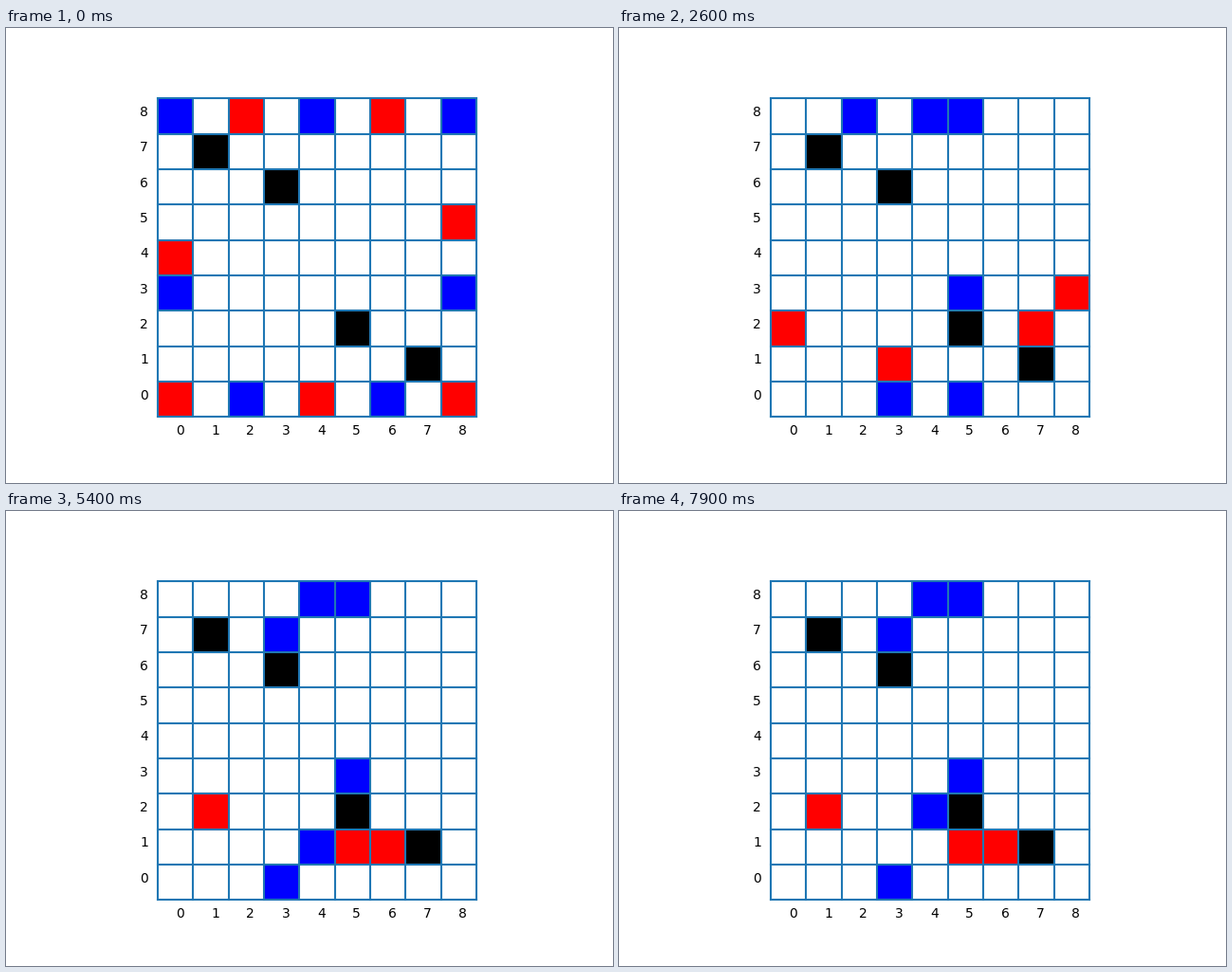
Recreate the animation shown at these times as a matplotlib script. Size 640x480 px, loop 8000 ms.

```python
import matplotlib.pyplot as plt
from matplotlib.animation import FuncAnimation
from matplotlib.patches import Rectangle

SIZE = 9
FRAMES = 80
INTERVAL = 100

STEP = {"N": (0, 1), "S": (0, -1), "E": (1, 0), "W": (-1, 0)}
WALLS = [(1, 7), (3, 6), (5, 2), (7, 1)]
BLUE = [(0, 8), (4, 8), (8, 8), (0, 3), (8, 3), (2, 0), (6, 0)]
RED = [(2, 8), (6, 8), (8, 5), (0, 4), (0, 0), (4, 0), (8, 0)]

# Column, row and direction of each turn; blue and red alternate.
OPENING = """
20E 85S 60W 80N 83W 81N 73W 84S 63W 68W 08E 00N 03S 04S 48W
03S 88W 01E 78W 58W 68W 11E 38E 21E 18E 82W 28E 72W 38S 62S
50W 61W 40N 83W 41N 73W 42S 63S 41N 62S 42S 02E 41N 12E 42S
""".split()
SHUFFLE = "22W 41N 12E 42S".split()


def neighbours(cell):
    x, y = cell
    return [(x + dx, y + dy) for dx, dy in STEP.values()]


def play(board, move):
    """Return the board after one move and its captures."""
    board = dict(board)
    x, y = int(move[0]), int(move[1])
    dx, dy = STEP[move[2]]
    cell = (x + dx, y + dy)
    side = board.pop((x, y))
    board[cell] = side
    for foe in neighbours(cell):
        if board.get(foe, side) in (side, "black"):
            continue
        if sum(board.get(n) == side for n in neighbours(foe)) >= 2:
            del board[foe]
    return board


def build_game():
    start = {c: "black" for c in WALLS}
    start.update({c: "blue" for c in BLUE})
    start.update({c: "red" for c in RED})
    boards = [start]
    for turn in range(FRAMES - 1):
        late = turn - len(OPENING)
        move = OPENING[turn] if late < 0 else SHUFFLE[late % len(SHUFFLE)]
        boards.append(play(boards[-1], move))
    return boards


boards = build_game()

fig, ax = plt.subplots(figsize=(6.4, 4.8), dpi=100)
ax.set_aspect("equal")
ax.set_xlim(-0.45, SIZE + 0.45)
ax.set_ylim(-0.45, SIZE + 0.45)
ax.axis("off")

for i in range(SIZE + 1):
    ax.plot([0, SIZE], [i, i], color="C0", lw=1.5)
    ax.plot([i, i], [0, SIZE], color="C0", lw=1.5)
for i in range(SIZE):
    ax.text(i + 0.5, -0.5, str(i))
    ax.text(-0.5, i + 0.5, str(i))

cells = {
    (x, y): ax.add_patch(Rectangle((x, y), 1, 1, lw=0, fc="white"))
    for x in range(SIZE)
    for y in range(SIZE)
}


def draw(frame):
    for pos, patch in cells.items():
        patch.set_facecolor(boards[frame].get(pos, "white"))
    return list(cells.values())


anim = FuncAnimation(fig, draw, frames=FRAMES, interval=INTERVAL,
                     repeat=True, repeat_delay=0)
plt.show()
```
